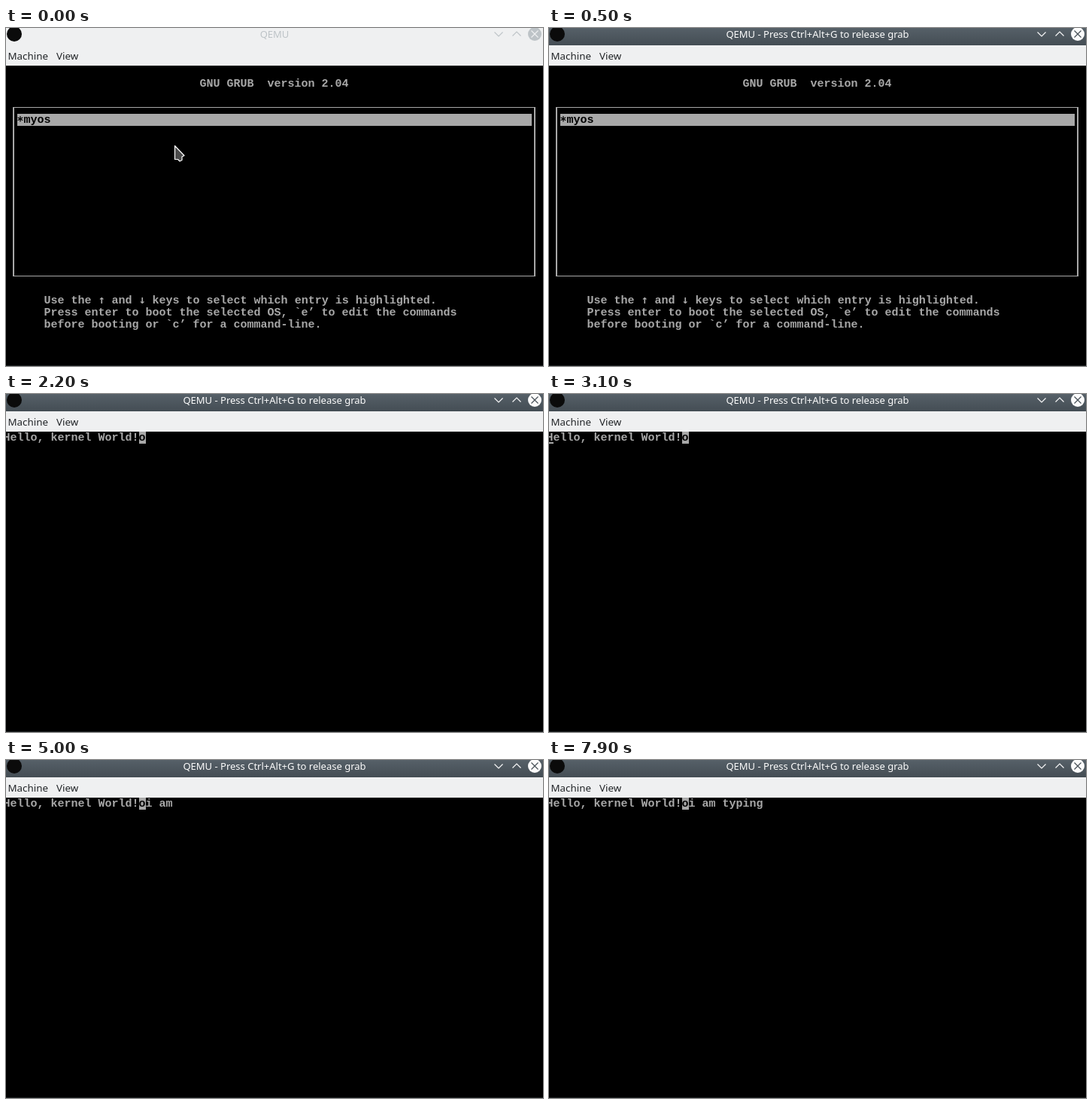
An HTML page for the animation above (8000 ms loop, 714 by 449 pixels).

```html
<!DOCTYPE html>
<html lang="en">
<head>
<meta charset="utf-8">
<title>Boot demo</title>
<style>
  html, body { margin: 0; width: 714px; height: 449px; overflow: hidden; background: #000; }
  svg { display: block; }
  text { white-space: pre; }
  .ui { font: 13px "Noto Sans", sans-serif; }
  .menubar { font-size: 13.33px; }
  .tty { font: bold 15px "Liberation Mono", monospace; fill: #a8a8a8; }
  .tty .inv { fill: #000; }
  .sym { font-family: "DejaVu Sans Mono", monospace; }
  .bar { --ink: #bdc3c7; --cut: #eff0f1; }
  .bar.fade { --ink: #c8cccf; --cut: #d0d3d5; }
  .bar.active { --ink: #fcfcfc; --cut: #475057; }
  .ink { fill: var(--ink); }
  .line { fill: none; stroke: var(--ink); stroke-width: 1.1; }
  .cut { fill: none; stroke: var(--cut); stroke-width: 1.2; }
</style>
</head>
<body>
<svg width="714" height="449" viewBox="0 0 714 449">
  <defs>
    <linearGradient id="fadeFill" x2="0" y2="1">
      <stop stop-color="#e2e4e5"/><stop offset="1" stop-color="#c7c9cb"/>
    </linearGradient>
    <linearGradient id="activeFill" x2="0" y2="1">
      <stop stop-color="#566068"/><stop offset="1" stop-color="#444d54"/>
    </linearGradient>
  </defs>

  <g id="bar" class="bar">
    <rect id="barFill" width="714" height="23" fill="#eff0f1"/>
    <circle cx="11" cy="8" r="10" fill="#0b0b0b"/>
    <text id="title" class="ui ink" x="357" y="13" text-anchor="middle">QEMU</text>
    <path class="line" d="M649.5 5.5l5.5 5.5 5.5-5.5M673.5 10.5l5.5-5.5 5.5 5.5"/>
    <circle class="ink" cx="703" cy="8" r="9"/>
    <path class="cut" d="M698.5 3.5l9 9m0-9l-9 9"/>
  </g>

  <rect y="23" width="714" height="27" fill="#eff0f1"/>
  <g class="ui menubar" fill="#232629">
    <text x="2.500" y="42">Machine</text>
    <text x="67" y="42">View</text>
  </g>

  <g id="menu" class="tty">
    <text x="257.500" y="78">GNU GRUB  version 2.04</text>
    <path d="M9 105h695v225h-695zM11 106v223h691v-223z" fill-rule="evenodd"/>
    <rect x="15" y="114" width="684" height="16"/>
    <text class="inv sym" x="14.500" y="129">*</text>
    <text class="inv" x="23.500" y="126">myos</text>
    <text x="50.500" y="366">Use the <tspan class="sym">↑</tspan> and <tspan class="sym">↓</tspan> keys to select which entry is highlighted.</text>
    <text x="50.500" y="382">Press enter to boot the selected OS, `e’ to edit the commands</text>
    <text x="50.500" y="398">before booting or `c’ for a command-line.</text>
  </g>

  <path id="pointer" d="M224.5 156.5v18h4l2.500 2.500 3-1.500v-4.500l3-1.500z"
        fill="#4c4c4c" stroke="#fff" stroke-width="1.2" stroke-linejoin="round"/>

  <g id="kernel" class="tty">
    <text x="-3.500" y="62">Hello, kernel World!</text>
    <rect x="177" y="50" width="9" height="16"/>
    <text class="inv" x="176.500" y="62">o</text>
    <text id="typed" x="185.500" y="62"></text>
    <rect id="caret" x="-3" y="64" width="9" height="2"/>
  </g>
  <rect y="448" width="714" height="1" fill="#1c1f21"/>
</svg>
<script>
  const LOOP = 8000;
  const MESSAGE = 'i am typing';
  const KEYS = [3700, 4000, 4300, 4500, 5800, 6200, 6400, 7200, 7500, 7600, 7900];
  const BLINKS = [1900, 2200, 2700, 2900, 3100, 3400, 3600, 3900, 4200, 4500, 4700, 5000,
                  5300, 5600, 5800, 6100, 6400, 6600, 6900, 7200, 7400, 7700];

  const el = id => document.getElementById(id);
  const show = (id, on) => el(id).setAttribute('visibility', on ? 'visible' : 'hidden');
  const passed = (times, t) => times.filter(x => x <= t).length;
  const start = performance.now();

  function draw(now) {
    const t = Math.max(0, now - start) % LOOP;
    const state = t < 400 ? '' : t < 500 ? 'fade' : 'active';

    el('bar').setAttribute('class', 'bar ' + state);
    el('barFill').setAttribute('fill', state ? `url(#${state}Fill)` : '#eff0f1');
    el('title').textContent = state ? 'QEMU - Press Ctrl+Alt+G to release grab' : 'QEMU';

    show('pointer', t < 400);
    show('menu', t < 1700);
    show('kernel', t >= 1800);
    // The caret is a child of the kernel screen, so it must not outlive it.
    show('caret', t >= 1800 && passed(BLINKS, t) % 2);
    el('typed').textContent = MESSAGE.slice(0, passed(KEYS, t));
    requestAnimationFrame(draw);
  }
  draw(start);
</script>
</body>
</html>
```
